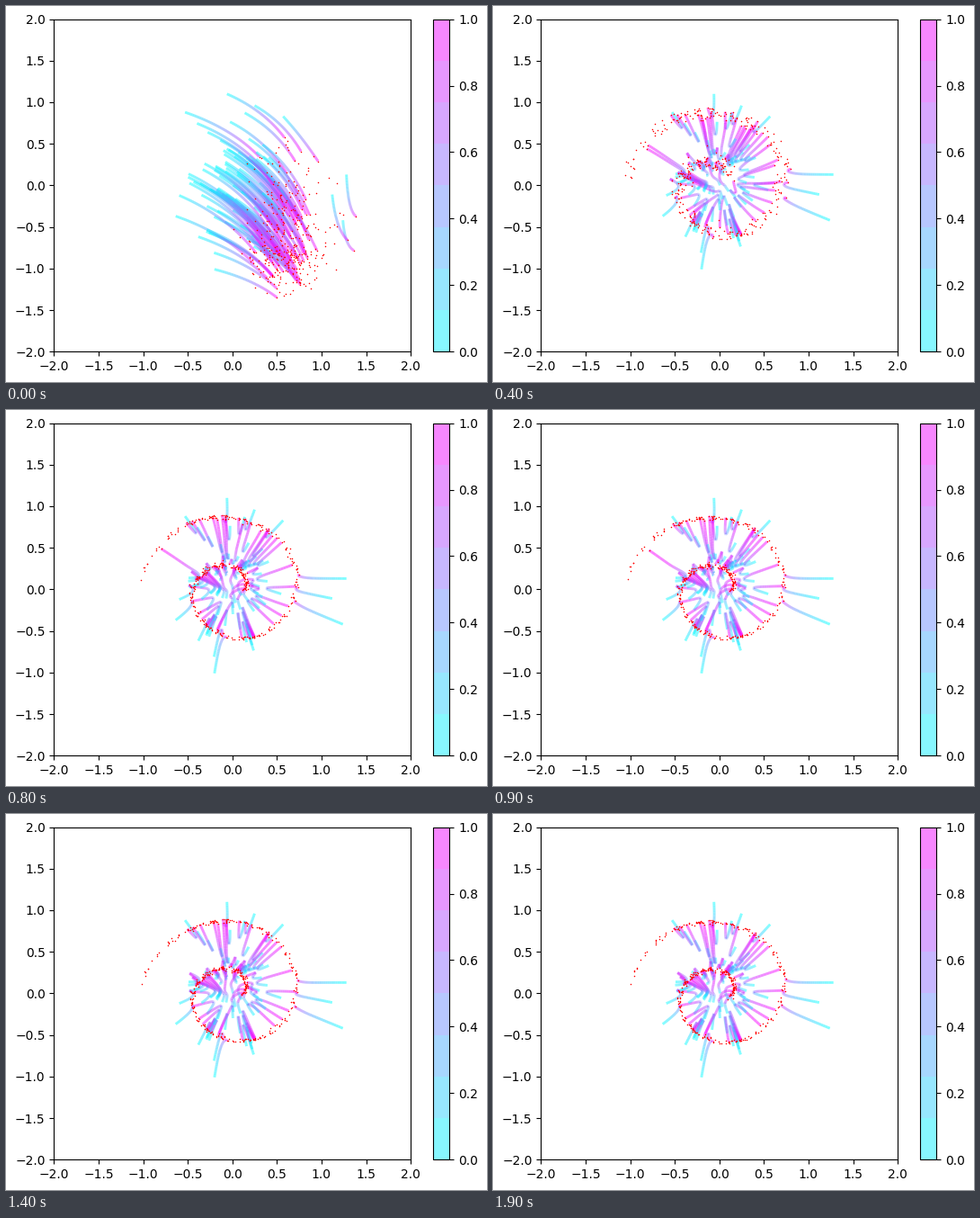
These frames come from a looping animation (535x418 px, 2000 ms). A matplotlib script:

```python
import numpy as np
import matplotlib.pyplot as plt
from matplotlib.animation import FuncAnimation
from matplotlib.cm import ScalarMappable
from matplotlib.collections import LineCollection
from matplotlib.colors import ListedColormap, Normalize

W, H, DPI = 535, 418, 100
FRAMES, INTERVAL = 20, 100
STEPS = 50
SIGMA = 0.46
N_LINES, N_POINTS = 92, 390

# The farthest starts, which give the bundle its outline
FAR = [(-0.06, 1.10), (-0.53, 0.88), (0.25, 0.96), (0.57, 0.83),
       (1.28, 0.13), (1.24, -0.42), (1.12, -0.11), (-0.20, -1.01)]


def sample(rng, n, center, spread, reach):
    """Normal points, cut off outside an ellipse."""
    p = rng.normal(0, spread, (4 * n, 2))
    inside = ((p / reach) ** 2).sum(axis=1) < 1
    return p[inside][:n] + center


def make_starts():
    rng = np.random.default_rng(12)
    near = sample(rng, N_LINES - len(FAR), (-0.06, 0), (0.37, 0.42),
                  (0.65, 0.95))
    rest = sample(rng, N_POINTS - N_LINES, (0, 0), (0.44, 0.44), (1.1, 1.1))
    return np.vstack([FAR, near, rest])


def untrained_paths(p):
    """Every point drifts to the lower right on a bent path."""
    x, y = p.T
    dx = 0.62 - 0.4 * x
    dy = -0.8 + np.where(y > 0, 0.25, 0.45) * np.abs(y) + 0.16 * x ** 2
    bend = 0.27 - 1.1 * np.clip(x - 0.4, 0, 0.9)
    t = np.linspace(0, 1, STEPS + 1)[:, None]
    px = x + dx * ((1 + bend) * t - bend * t ** 2)
    py = y + dy * ((1 - bend) * t + bend * t ** 2)
    return np.stack([px, py], axis=-1)


def spiral(k):
    """Spiral as learnt after k epochs: the inner turn appears last."""
    inner, outer = 1.35 + 6 * np.exp(-0.4 * k), 10.95
    phi = inner + (outer - inner) * np.linspace(0, 1, 240) ** 0.85
    r = 0.0915 * phi * (1 + 0.12 * np.exp(-k / 8) * (phi / outer) ** 10)
    return np.stack([r * np.sin(phi), -r * np.cos(phi)], axis=1)


def flow_paths(p, k):
    """Integrate the flow that carries a Gaussian onto a blurred spiral."""
    m = spiral(k)
    m_sq = (m ** 2).sum(axis=1)
    blur = 0.017 + 0.3 * np.exp(-0.75 * (k - 1))
    x = p.copy()
    path = [x]
    for i in range(STEPS):
        t = i / STEPS
        var = (1 - t) ** 2 * SIGMA ** 2 + t ** 2 * blur ** 2
        logit = (t * (x @ m.T) - t * t * m_sq / 2) / var
        w = np.exp(logit - logit.max(axis=1, keepdims=True))
        mean = (w @ m) / w.sum(axis=1, keepdims=True)
        goal = mean + t * blur ** 2 / var * (x - t * mean)
        x = x + (goal - x) / (STEPS - i)
        path.append(x)
    path = np.array(path)

    # Small smooth error of the fit, different at every epoch
    a, b = np.random.default_rng(100 + k).uniform(0, 2 * np.pi, 2)
    amp = 0.01 + 0.08 * np.exp(-0.5 * k)
    t2 = np.linspace(0, 1, STEPS + 1)[:, None] ** 2
    shift = np.stack([np.sin(4 * path[..., 1] + a),
                      np.sin(4 * path[..., 0] + b)], axis=-1)
    return path + amp * t2[..., None] * shift


def to_segments(path):
    lines = path[:, :N_LINES].transpose(1, 0, 2)
    return np.stack([lines[:, :-1], lines[:, 1:]], axis=2).reshape(-1, 2, 2)


def place(left, top, width, height):
    return fig.add_axes((left / W, 1 - (top + height) / H,
                         width / W, height / H))


starts = make_starts()
paths = [untrained_paths(starts)]
paths += [flow_paths(starts, k) for k in range(1, FRAMES)]

fig = plt.figure(figsize=(W / DPI, H / DPI), dpi=DPI, facecolor="white")
ax = place(53.3, 14.6, 396.8, 369.6)
ax.set(xlim=(-2, 2), ylim=(-2, 2))
ticks = np.arange(-2, 2.1, 0.5)
ax.set_xticks(ticks)
ax.set_yticks(ticks)

level = (np.arange(8) + 0.5) / 8
bands = ListedColormap([((1 + v) / 2, 1 - v / 2, 1) for v in level])
fig.colorbar(ScalarMappable(Normalize(0, 1), bands),
             cax=place(474.9, 14.6, 18.48, 369.6))

trails = LineCollection([], cmap="cool", norm=Normalize(0, 1),
                        linewidths=2.1, alpha=0.5, zorder=2)
trails.set_array(np.tile(np.linspace(0, 1, STEPS), N_LINES))
ax.add_collection(trails, autolim=False)
dots = ax.scatter(*starts.T, s=1.2, c="red", linewidths=0, zorder=3)


def draw(i):
    trails.set_segments(to_segments(paths[i]))
    dots.set_offsets(paths[i][-1])
    return trails, dots


anim = FuncAnimation(fig, draw, frames=FRAMES, interval=INTERVAL,
                     init_func=lambda: draw(0), repeat=True, repeat_delay=0)
plt.show()
```
